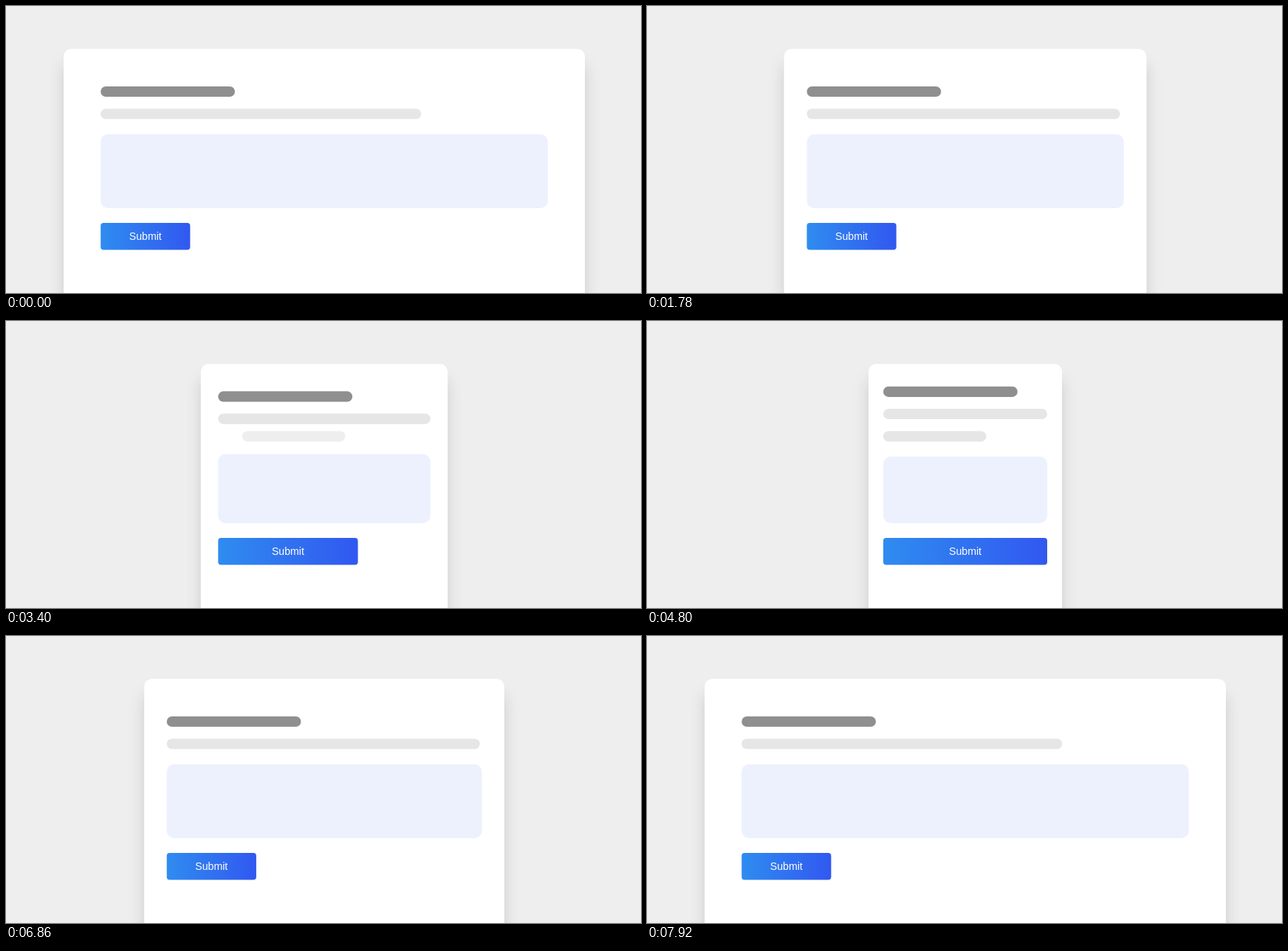
These frames come from a looping animation (860 by 389 pixels, 7940 ms). An HTML page:

```html
<!DOCTYPE html>
<html lang="en">
<head>
<meta charset="utf-8">
<title>Responsive form</title>
<style>
html, body { margin: 0; width: 100%; height: 100%; overflow: hidden; background: #eee; }
svg { display: block; }
text { font: 14.14px "Liberation Sans", Arial, sans-serif; fill: #fff; text-anchor: middle; }
</style>
</head>
<body>
<svg width="860" height="389" viewBox="0 0 860 389">
  <defs>
    <linearGradient id="blue">
      <stop stop-color="#2f8cf0"/>
      <stop offset="1" stop-color="#3158f0"/>
    </linearGradient>
    <filter id="shadow" filterUnits="userSpaceOnUse" x="0" y="0" width="860" height="560">
      <feDropShadow dx="0" dy="20" stdDeviation="10" flood-opacity=".15"/>
    </filter>
  </defs>
  <rect id="card" y="58.3" height="480" rx="10" fill="#fff" filter="url(#shadow)"/>
  <rect id="title" width="181.8" height="14.1" rx="7" fill="#8f8f8f"/>
  <rect id="line" height="14.1" rx="7" fill="#e6e6e6"/>
  <rect id="wrapped" x="320" y="149.3" width="139.4" height="14.1" rx="7" fill="#e6e6e6"/>
  <rect id="field" rx="10" fill="#edf1fe"/>
  <rect id="button" y="294.1" height="36.4" rx="4" fill="url(#blue)"/>
  <text id="label" y="317">Submit</text>
</svg>
<script>
const LOOP = 7940, DURATION = 415;
// Start time and direction of each step between desktop (0), tablet (1) and phone (2)
const MOVES = [[1422, 1], [3197, 1], [5021, -1], [6857, -1]];

// cubic-bezier(0, 0, .58, 1), solved by bisection
function easeOut(x) {
  if (x <= 0) return 0;
  if (x >= 1) return 1;
  let lo = 0, hi = 1;
  for (let i = 0; i < 24; i++) {
    const s = (lo + hi) / 2;
    if (1.74 * s * s * (1 - s) + s ** 3 < x) lo = s; else hi = s;
  }
  return lo * lo * (3 - 2 * lo);
}

function set(id, attrs) {
  const el = document.getElementById(id);
  for (const name in attrs) el.setAttribute(name, attrs[name]);
}

function draw(now) {
  const t = now % LOOP;
  const size = MOVES.reduce((sum, [start, dir]) => sum + dir * easeOut((t - start) / DURATION), 0);
  const phone = Math.max(0, size - 1);
  const mix = (desktop, tablet, mobile) => size < 1
    ? desktop + (tablet - desktop) * size
    : tablet + (mobile - tablet) * phone;

  const left = mix(78, 189, 300);
  const x = mix(128.2, 219.2, 320);
  const top = 173.7 + 10 * phone;
  const buttonWidth = mix(121.2, 121.2, 222);

  set("card", { x: left, width: 862 - 2 * left });
  set("title", { x, y: 109 - 20.2 * phone });
  set("line", { x, y: 139.2 - 20.2 * phone, width: mix(434, 423.8, 222) });
  set("wrapped", { opacity: phone });
  set("field", { x, y: top, width: mix(605.6, 423.8, 222), height: 273.9 - top });
  set("button", { x, width: buttonWidth });
  set("label", { x: x + buttonWidth / 2 });
  requestAnimationFrame(draw);
}
draw(0);
</script>
</body>
</html>
```
